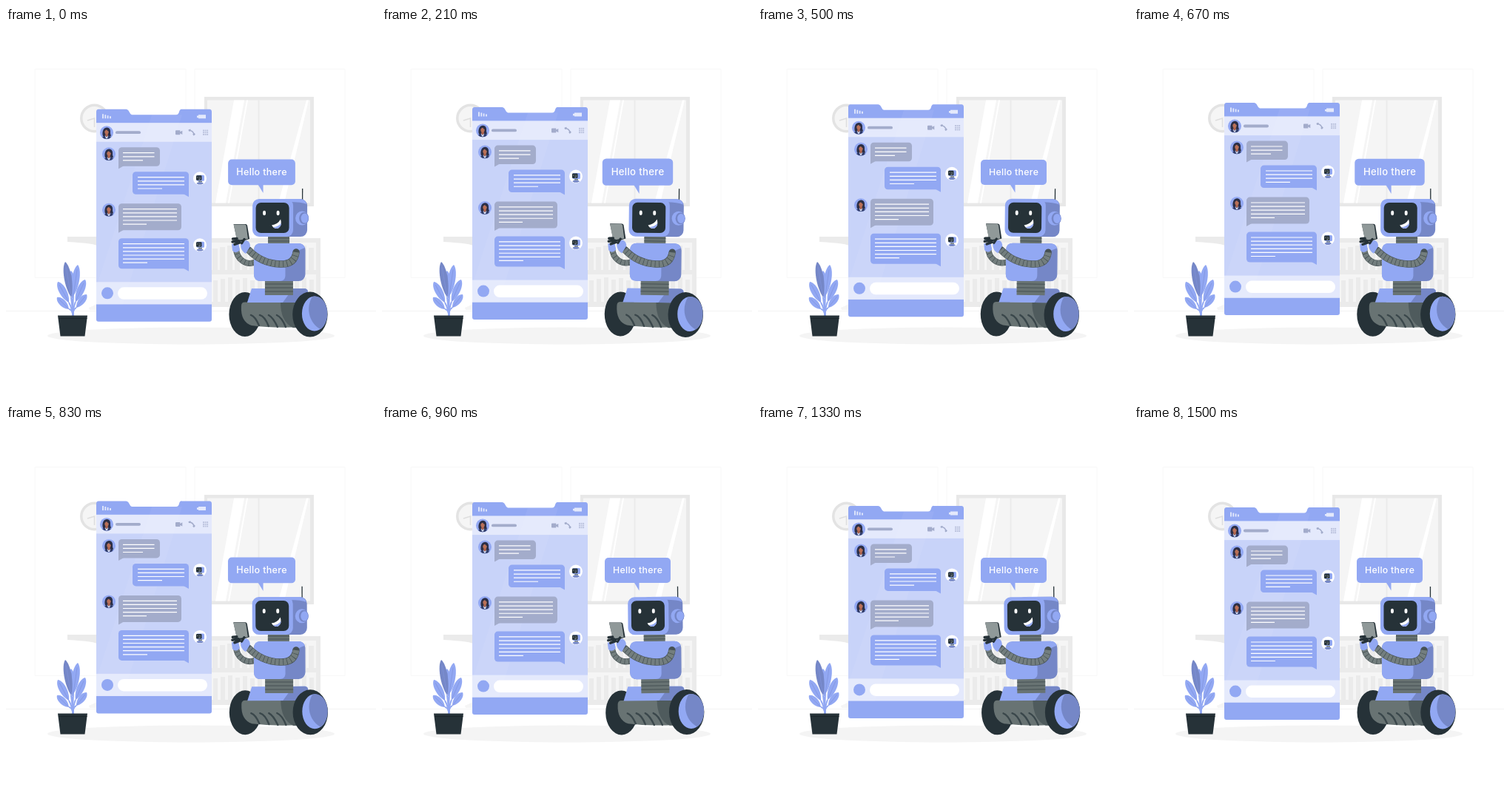
Animation, 500 px wide and 500 px high, one loop 1.54 s. Source, as an HTML page:

```html
<!DOCTYPE html>
<html lang="en">
<head>
<meta charset="utf-8">
<title>Chat robot</title>
<style>
html, body { margin: 0; width: 100%; height: 100%; overflow: hidden; background: #fff; }
svg { display: block; width: 100vw; height: 100vh; }
.main { fill: #92a8f3; }
.shade { fill: #7587c7; }
.dark { fill: #263238; }
.steel { fill: #687373; }
.grey { fill: #a3accb; }
.soft { fill: #ebebeb; }
.pale { fill: #f5f5f5; }
.white { fill: #fff; }
.line { fill: none; stroke-linecap: round; }
.tube { fill: none; stroke: #465154; }
.rings { fill: none; stroke: #737e7e; stroke-dasharray: 4.5 .8; }
text { font: 500 12.3px Inter, "Open Sans", sans-serif; letter-spacing: .3px; fill: #fff; text-anchor: middle; }
</style>
</head>
<body>
<svg viewBox="0 0 500 500">
  <defs>
    <clipPath id="disc"><circle r="8.6"/></clipPath>
    <g id="woman">
      <circle class="main" r="9"/>
      <g clip-path="url(#disc)">
        <path fill="#2b2f47" d="M-5 5C-6.500 0-5-6.500 0-6.800C4.500-7 5.500-3 5 1L6 5Z"/>
        <path fill="#2f3b68" d="M-7 10Q-6.500 4 0 4T7 10Z"/>
        <path fill="#a9614c" d="M-1.500 1H1.800V4.500L0 6L-2 4.500Z"/>
        <path fill="#dfe5fb" d="M-2.300 4L0 6.300L2.300 4L1 8H-1Z"/>
        <ellipse cy="-1" rx="2.700" ry="3.400" fill="#b97058"/>
        <path fill="#2b2f47" d="M-3.500-1Q-3-5.800 .8-5.600Q4-5 3.700-1Q1-2 0-4Q-2-3-3.500-1Z"/>
      </g>
    </g>
    <g id="bot">
      <circle class="white" r="9"/>
      <rect class="main" x="-4.500" y="-4.500" width="10.500" height="8" rx="1.500"/>
      <rect class="dark" x="-5" y="-4" width="7.500" height="6.500" rx="1.200"/>
      <path d="M-3-2V-.8M0-2V-.8M-1.500 1Q0 1.500 .8 .2" stroke="#fff" stroke-width=".6" fill="none"/>
      <path class="steel" d="M-2 3.500H3V5H-2Z"/>
      <path class="shade" d="M-4.500 7Q-4 5 0 5T5 7L2 8.300H-2Z"/>
    </g>
    <path id="farArm" d="M338 316C325 322 311 313 311 297"/>
    <path id="nearArm" d="M392 303Q390 320 370 319Q345 318 328 300"/>
  </defs>

  <g id="room">
    <path d="M39 55.500H243V337.500H39ZM255 55.500H458V337.500H255Z" fill="none" stroke="#f8f8f8"/>
    <path d="M0 382.500H500" stroke="#f3f3f3"/>
    <circle cx="119.500" cy="122" r="19.500" fill="#e3e3e3"/>
    <circle cx="119.500" cy="122" r="16" class="pale"/>
    <path d="M110 125L119.500 122V134" fill="none" stroke="#dedede" stroke-width="1.500"/>
    <path class="soft" d="M83 282H125V295Q121 291 83 289Z"/>
    <path class="pale" d="M112 378L125 372V381H113Z"/>
    <rect x="268" y="93" width="148" height="148" fill="#e8e8e8"/>
    <rect x="272" y="97.500" width="139" height="139" class="pale"/>
    <path class="white" d="M308 97.500H322L297 236.500H283ZM325 97.500H327L302 236.500H300ZM406 97.500H409L376 236.500H368Z"/>
    <path d="M341.500 97V237" stroke="#ebebeb" stroke-width="2"/>
    <rect x="270" y="284" width="155" height="93" class="soft"/>
    <path class="pale" d="M270 290H419V327H270ZM270 333H419V370H270Z"/>
    <g id="books" class="soft"></g>
    <ellipse cx="250" cy="416" rx="194" ry="11.500" fill="#f4f4f4"/>
  </g>

  <g id="plant">
    <g id="leaves"></g>
    <path class="dark" d="M70 388.500H110L106.500 416.500H73.500Z"/>
    <path d="M71 392.500H109.500" stroke="#1c262b"/>
  </g>

  <g id="phone">
    <path class="main" d="M122 113Q122 109.500 125 109.500H162Q165 109.500 166.500 113T170 117H230Q233 117 234 113T237.500 109.500H275Q278 109.500 278 113V393.500Q278 396.500 275 396.500H125Q122 396.500 122 393.500Z"/>
    <rect x="122" y="128" width="156" height="245" fill="#c8d3f9"/>
    <rect x="122" y="128" width="156" height="25.500" fill="#e4e9fc"/>
    <rect x="122" y="343" width="156" height="30" fill="#e4e9fc"/>
    <path d="M197 117H238L158 373H122V350Z" fill="#fff" opacity=".05"/>
    <path d="M131 116V122M134.300 117V122M137.600 118V122M141 119V122" stroke="#e4e9fc" stroke-width="1.800"/>
    <path fill="#e4e9fc" d="M260 117H270V122H260V121H258V118.300H260Z"/>
    <use href="#woman" x="136" y="141"/>
    <rect x="148" y="139" width="34" height="3.800" rx="1.900" class="grey"/>
    <path class="grey" d="M230 138H235.300V140L238.300 138.400V143.600L235.300 142V144H230Q229 144 229 143V139Q229 138 230 138Z"/>
    <path class="line" d="M247.700 138.200Q252.500 138 254.300 143.800" stroke="#a3accb" stroke-width="1.600"/>
    <path d="M246.800 138.300L249.600 137.300M252.800 144.200L255.300 142.500" stroke="#a3accb" stroke-width="2.200"/>
    <g id="grid" class="grey" opacity=".65"></g>
    <g id="chat"></g>
    <use href="#woman" x="139" y="170"/>
    <use href="#woman" x="139" y="245.500"/>
    <use href="#bot" x="262" y="203"/>
    <use href="#bot" x="262" y="293"/>
    <circle cx="137" cy="358" r="8" class="main"/>
    <rect x="151" y="350" width="121" height="16.500" rx="8.200" class="white"/>
  </g>

  <g id="robot">
    <ellipse cx="323" cy="387" rx="21.500" ry="30" class="dark"/>
    <path class="steel" d="M318 376Q318 370.500 323 370.500H397V404Q362 406 332 402Q317 397 318 376Z"/>
    <path fill="#4f5b5d" d="M371 370H400V405H388Q371 397 371 370Z"/>
    <path class="line" d="M331 388Q337 390 342 402M343 388Q350 390 355 403M355 388Q361 391 367 404M366 388Q373 391 378 404" stroke="#3a474b" stroke-width="2.400"/>
    <path class="main" d="M332 352H404Q409 353 408 358L396 371H326Z"/>
    <path class="shade" d="M388 352H404Q411 354 405 362L394 371H374Z"/>
    <ellipse cx="411" cy="387" rx="23.700" ry="30.500" class="dark"/>
    <ellipse cx="417" cy="386" rx="17" ry="23.500" class="main"/>
    <path class="shade" d="M414 363C405 378 409 398 425 407C439 398 437 367 421 363Q417 362 414 363Z"/>

    <rect x="350" y="340" width="38" height="21" class="steel"/>
    <path d="M350 346H388M350 351H388M350 356H388" stroke="#465154"/>
    <rect x="354" y="279" width="29" height="13" class="steel"/>
    <path d="M354 284H383M354 288H383" stroke="#465154"/>
    <use href="#farArm" class="tube" stroke-width="8"/>
    <use href="#farArm" class="rings" stroke-width="7"/>

    <rect x="335" y="291" width="69.500" height="51" rx="9" class="shade"/>
    <path class="main" d="M344 291H395.500Q402 291 404 297Q385 303 377.500 321V335Q377 342 370 342H344Q335 342 335 333V300Q335 291 344 291Z"/>
    <use href="#nearArm" class="tube" stroke-width="9.500" stroke-linecap="round"/>
    <use href="#nearArm" class="rings" stroke-width="8.500"/>

    <path d="M400.500 217V250" stroke="#263238" stroke-width="1.300"/>
    <rect x="352" y="231" width="55" height="51" rx="9" class="shade"/>
    <rect x="333" y="231" width="55" height="51" rx="9" class="main"/>
    <path class="main" d="M360 231H398Q405 232 406 238Q400 235 382 235Z"/>
    <rect x="337.500" y="236" width="45" height="41" rx="7" class="dark"/>
    <ellipse cx="349" cy="250" rx="2" ry="3.200" class="white"/>
    <ellipse cx="367.500" cy="250" rx="2" ry="3.200" class="white"/>
    <path class="white" d="M359 266.500Q367 265.500 371 258.500Q373.500 267 368 270.500Q362.500 272.500 359 266.500Z"/>
    <path class="main" d="M361 269Q368 269 371.800 263.500Q371.500 268.500 368 270.500Q364.500 272 361 269Z"/>
    <ellipse cx="400" cy="257" rx="9" ry="9.500" class="main"/>
    <ellipse cx="402.500" cy="257" rx="6.500" ry="8" class="shade"/>
    <ellipse cx="403.500" cy="257" rx="5" ry="6.500" class="main"/>

    <path class="main" d="M305 292L314 290L316 300Q311 306 306 301Z"/>
    <path class="dark" d="M307.500 265H323.500Q325.500 265 326 267L329 285L313 290Z"/>
    <path fill="#909999" d="M307.500 265.500H322.500Q324 265.500 324.500 267L327 285L312 287Z"/>
    <path class="line" d="M306.500 285L312 284.500M306 289L314 287.500M309 292.500L316 290" stroke="#263238" stroke-width="3.500"/>
    <path class="main" d="M317 293Q318 288 325 287Q330 289 330 295L324 305Q317 301 317 293Z"/>
    <path class="line" d="M318.500 291L322 285.500" stroke="#263238" stroke-width="3.200"/>
  </g>

  <g id="hello">
    <rect x="301" y="178" width="89" height="34" rx="5" class="main"/>
    <path class="main" d="M340.500 211H347.500V222.500Z"/>
    <text x="345.600" y="198.700">Hello there</text>
  </g>
</svg>
<script>
const LOOP = 1540, LEAD = 30, REST = .7;
const $ = id => document.getElementById(id);

// x, y, width, height, line count, length of last line, line start, sent by the robot
const bubbles = [
  [152, 161, 56, 25.5, 3, 27, 158, 0],
  [171, 194, 76, 30.5, 4, 33, 178, 1],
  [152, 237, 85, 36, 5, 32, 158, 0],
  [152, 284, 95, 41, 6, 33, 158, 1]
];

function bubble([x, y, w, h, n, last, lx, own]) {
  const side = own ? x + w : x, dir = own ? -1 : 1, low = y + h;
  const end = own ? 241 : x + w - (n === 3 ? 7.5 : 6);
  let rows = '';
  for (let i = 0; i < n; i++) {
    rows += `M${lx} ${y + 7.4 + i * 5.1}H${i === n - 1 ? lx + last : end}`;
  }
  return `<g class="${own ? 'main' : 'grey'}">
    <rect x="${x}" y="${y}" width="${w}" height="${h}" rx="4.5"/>
    <path d="M${side} ${low - 7}V${low + 3.5}L${side + dir * 8} ${low - 1}Z"/>
    <path d="${rows}" stroke="#fff" stroke-width="1.2"/></g>`;
}

// tip x, tip y, foot x, foot y, width, class
const leaves = [
  [88, 328, 90, 366, 9, 'main'],
  [97, 320, 91, 362, 10, 'main'],
  [80, 316, 88, 364, 10, 'shade'],
  [107, 340, 94, 370, 10, 'main'],
  [109, 360, 95, 378, 9, 'main'],
  [70, 343, 85, 371, 10, 'main'],
  [69, 364, 85, 380, 9, 'main']
];

function leaf([tx, ty, fx, fy, w, cls]) {
  const dx = tx - fx, dy = ty - fy, len = Math.hypot(dx, dy);
  const nx = -dy / len * w * .67, ny = dx / len * w * .67;
  const at = (k, s) => `${fx + dx * k + nx * s} ${fy + dy * k + ny * s}`;
  return `<path d="M${fx} ${fy}Q90 380 90.500 390" fill="none" stroke="#92a8f3" stroke-width="2"/>
    <path class="${cls}" d="M${fx} ${fy}C${at(.3, 1)} ${at(.85, 1)} ${tx} ${ty}C${at(.85, -1)} ${at(.3, -1)} ${fx} ${fy}"/>
    <path d="M${at(.85, 0)}L${fx} ${fy}" stroke="#8093dc" stroke-width=".7"/>`;
}

const rect = (x, y, w, h) => `<rect x="${x}" y="${y}" width="${w}" height="${h}"/>`;

$('chat').innerHTML = bubbles.map(bubble).join('');
$('leaves').innerHTML = leaves.map(leaf).join('');

let dots = '', books = '';
for (let i = 0; i < 9; i++) {
  dots += rect(266 + i % 3 * 2.6, 137.3 + Math.floor(i / 3) * 2.7, 1.9, 1.9);
}
for (let i = 0; i < 14; i++) {
  const x = 279 + i * 10, h = 29 + i * 7 % 5;
  books += rect(x, 327 - h, 7, h) + rect(x + 1, 370 - h, 6, h);
}
$('grid').innerHTML = dots;
$('books').innerHTML = books;

// Straight-line interpolation through [position, value] keys
function track(p, keys) {
  let i = 1;
  while (i < keys.length - 1 && p > keys[i][0]) i++;
  const [a, u] = keys[i - 1], [b, v] = keys[i];
  return u + (v - u) * (p - a) / (b - a);
}

const floatKeys = [[0, 0], [.5, -10], [1, 0]];
const swayKeys = [[0, 0], [.25, 1], [.75, -1], [1, 0]];
const beatKeys = [[0, 1], [.1, 1.1], [.3, 1], [.4, 1], [.49, 1.1], [.58, 1], [1, 1]];

function draw(time) {
  const p = (time + LEAD) % LOOP / LOOP;
  $('phone').setAttribute('transform', `translate(0 ${track(p, floatKeys) + REST})`);
  $('robot').setAttribute('transform', `rotate(${track(p, swayKeys)} 368.5 317.5)`);
  const s = track(p, beatKeys);
  $('hello').setAttribute('transform', `translate(345.5 200) scale(${s}) translate(-345.5 -200)`);
}

const start = performance.now();
function tick() {
  draw(performance.now() - start);
  requestAnimationFrame(tick);
}
draw(0);
requestAnimationFrame(tick);
</script>
</body>
</html>
```
